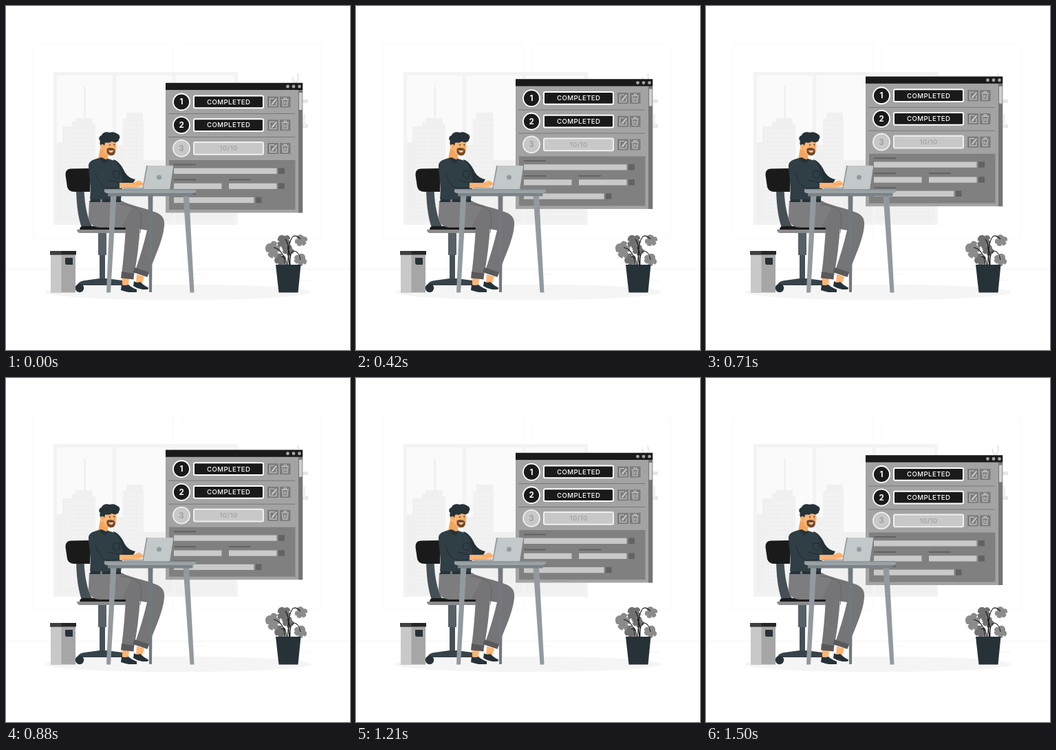
Recreate the animation shown at these times as an HTML page. Size 500x500 px, loop 1540 ms.

```html
<!DOCTYPE html>
<html lang="en">
<head>
<meta charset="utf-8">
<title>Completed tasks</title>
<style>
  html, body { margin: 0; width: 100%; height: 100%; overflow: hidden; background: #fff; }
  svg { display: block; width: 100vw; height: 100vh; }
  text { font-family: Inter, sans-serif; text-anchor: middle; }
  .label { font-size: 9.600px; font-weight: 500; letter-spacing: .45px; }
  .num { font-size: 11.500px; font-weight: 700; }
  .panel { animation: float 770ms linear -50ms infinite alternate; }
  @keyframes float {
    from { transform: translateY(.65px); }
    to { transform: translateY(-9.35px); }
  }
</style>
</head>
<body>
<svg viewBox="0 0 500 500" xmlns="http://www.w3.org/2000/svg">
  <defs>
    <pattern id="panes" width="5" height="6" patternUnits="userSpaceOnUse">
      <path d="M1 1h2.500v3H1z" fill="#f4f4f4"/>
    </pattern>
    <g id="icons">
      <path d="M380-8h16V8h-16zM398-8h15.500V8H398z" fill="#7c7c7c" stroke="none"/>
      <g fill="none" stroke="#c9c9c9" stroke-width="1.100">
        <path d="M390-5h-6.500V5.500h9.500v-6"/>
        <path d="M387.300 2.300l6-7" stroke-width="2"/>
        <path d="M386.500 3.300l.8-2 1.200 1z"/>
        <path d="M401.800-2.500l.8 8h6.300l.8-8M400.500-3.600H411M404-4v-1.800h3.600V-4M404.500-1v4.500M407-1v4.500"/>
      </g>
    </g>
    <g id="row">
      <circle cx="255" r="12" stroke-width="1.800"/>
      <rect x="273" y="-9" width="101" height="17.800" rx="2" stroke-width="2"/>
      <use href="#icons"/>
    </g>
    <path id="leaf" d="M0-9C3-13 9-11 10-6L7-4 11-2C12 2 10 5 8 6L5 5 6 8C4 11 1 12-2 12L-3 9-5 11C-9 10-11 6-10 3L-7 2-11 0C-12-6-8-12 0-9Z"/>
  </defs>

  <!-- room -->
  <g fill="none" stroke="#f9f9f9">
    <path d="M39.500 55.500h203v282h-203zM255 55.500h202.500v282H255z"/>
    <path d="M0 382.500h500M64 391.500h22M412 398.500h31M270 389.500h17" stroke="#f5f5f5"/>
  </g>
  <path d="M69 96h268v222H69z" fill="#f3f3f3"/>
  <path d="M74 101h81v212H74zM160 101h82v212h-82zM247 101h85v212h-85z" fill="#fafafa"/>
  <path d="M74 198h8v-23h14v-7h5v-5h12v-46h3v46h10v9h4v56h4v85H74zM160 202h10v-38h5v-9h24v9h1v60h42v89h-82zM247 240h32v30h53v43h-85z" fill="#f0f0f0"/>
  <path d="M84 178h44v126H84zM172 167h26v140h-26zM250 286h80v22h-80z" fill="url(#panes)"/>
  <g fill="none" stroke="#e6e6e6">
    <path d="M424 98l1 7q-1 5-5 8M416 103q1 6 4 10" stroke-width="2"/>
    <path d="M424 138.500h15M424 174.500h15" stroke-width="5"/>
    <path d="M433.500 157v18" stroke="#f0f0f0" stroke-width="3"/>
  </g>
  <ellipse cx="250" cy="416" rx="193.500" ry="11.300" fill="#f5f5f5"/>

  <!-- task window -->
  <g class="panel">
    <path d="M232 112h199.200v188.500H232z" fill="#a3a3a3"/>
    <path d="M425 122h6.200v178.500H425z" fill="#757575"/>
    <path d="M232 111.800h199.200V122H232z" fill="#1a1a1b"/>
    <g fill="#a6a6a6">
      <circle cx="409.500" cy="117" r="2.400"/><circle cx="418" cy="117" r="2.400"/><circle cx="426.500" cy="117" r="2.400"/>
    </g>
    <rect x="426" y="126" width="4.500" height="25" rx="1" fill="#cfcfcf"/>
    <path d="M236 156.500h184M236 190.500h184" stroke="#787878"/>
    <g fill="#1a1a1b" stroke="#fff">
      <use href="#row" y="139.500"/>
      <use href="#row" y="173.200"/>
    </g>
    <use href="#row" y="206.900" fill="#c8c8c8" stroke="#f0f0f0"/>
    <g fill="#fff">
      <text class="num" x="255" y="143.500">1</text>
      <text class="num" x="255" y="177.200">2</text>
      <text class="label" x="323.700" y="142.800">COMPLETED</text>
      <text class="label" x="323.700" y="176.500">COMPLETED</text>
    </g>
    <g fill="#a0a0a0">
      <text class="num" x="255" y="210.900">3</text>
      <text class="label" x="323.700" y="210.200">10/10</text>
    </g>
    <path d="M237 224h183.500v72H237z" fill="#808080"/>
    <path d="M244 229.500h32v2h-32zM244 251.500h32v2h-32zM324 251.500h32v2h-32zM244 272.500h32v2h-32zM396 235.500h9v8.500h-9zM396 257.500h9v8.500h-9zM363 277.700h8.500v8.500H363z" fill="#626262"/>
    <path d="M244 235.700h149.500v8.300H244zM244 257.700h69.500v8.300H244zM324 257.700h69.500v8.300H324zM244 277.900h116.500v8.300H244z" fill="#c9c9c9"/>
  </g>

  <!-- bin -->
  <path d="M65 361h36v55.500H65z" fill="#a6a6a6"/>
  <path d="M65 361h15.500v55.500H65z" fill="#c8c8c8"/>
  <path d="M64 356h38v5.500H64z" fill="#262626"/>
  <path d="M64 356h16.500v5.500H64z" fill="#3f3f3f"/>
  <path d="M86 366h11v10h-8.500q-2.500 0-2.500-3z" fill="#263238"/>

  <!-- chair -->
  <path d="M102 267h11.500c1 24 5 42 12 54h-16c-5-16-7-33-7.500-54z" fill="#455056"/>
  <path d="M94 236.500l28-.5v34H99q-8 0-10-7l-2.500-17q-.7-9 7.500-9.500z" fill="#1a1a1b"/>
  <path d="M136 360h8v38h-8z" fill="#455056"/>
  <path d="M134 329h12v33h-12z" fill="#566167"/>
  <path d="M104 405q2-5 10-6l22-3h10l24 3v7h-66z" fill="#37434a"/>
  <circle cx="107" cy="410" r="6.200" fill="#263238"/>
  <path d="M107 325q0-5 6-5h62v5z" fill="#1a1a1b"/>
  <path d="M103 325h71v5h-67q-4-1-4-5z" fill="#8b8b8d"/>

  <!-- legs -->
  <path d="M190 390l11 3-3 10-9-2zM169 395h10l-1 11h-9z" fill="#ffb573"/>
  <path d="M186 400q4 3 9 1 5 5 12 8.500 0 2.500-2 2.500h-7q-7-1-13-5z" fill="#263238"/>
  <path d="M168 405q5 2 10 0 4 4 12 7v4h-12q-5-1-11-3z" fill="#263238"/>
  <path d="M150 283h18c12 7 30 9 50 17 10 4 13 10 12 20-2 22-15 46-23 70l-19-6q10-28 17-58l-46-8z" fill="#757476"/>
  <path d="M121 283h45c3 6 13 7 20 9 9 3 11 12 9 26q-2 38-9 74l-18-2q4-32 6-68h-38q-15-1-15-15z" fill="#757476"/>
  <path d="M121 283h45c3 5 9 7 17 9l-15 29h-32q-16-1-16-15z" fill="#7d7c7e"/>
  <path d="M187 380l21 7-2.500 7-21-7zM168 386l18 3-.5 8.500-18.500-2z" fill="#59585b"/>
  <path d="M166 288q20 2 28 10 5 9 1 32" fill="none" stroke="#5f5e61" stroke-width=".8"/>

  <!-- torso and head -->
  <path d="M137 207h12l-1 13 3 5-7 3-10-6z" fill="#f3a45f"/>
  <path d="M156 223c9 3 13 11 17 19q5 8 15 10l-4 7-18-1z" fill="#263238"/>
  <path d="M135 221q6 4 13 1l7 2c7 2 9 8 11 14l4 18-3 25h-45c2-17-1-32-2-47-.5-8 4-10 15-13z" fill="#303e45"/>
  <path d="M130 243c4 12 9 21 18 22l17-1M148 253l17 4M156 240h9v8l-4 3-5-3z" fill="none" stroke="#1d282d" stroke-width=".8"/>
  <path d="M135 221q3 5 9 8 5-4 5-7l-2 2-8-4z" fill="#263238"/>
  <path d="M123 281h44v4h-45z" fill="#263238"/>
  <path d="M137 281h3v4h-3zM152 281h3v4h-3z" fill="#747c80"/>
  <path d="M165 257h18c5 0 7-4 12-3q4 2 5 5l-4 3-11 2-20 1z" fill="#ffb573"/>
  <path d="M183 258q6 2 14 0" fill="none" stroke="#e59655" stroke-width=".7"/>

  <path d="M140 193q10-5 19 0c2 8 2 14 0 20-3 5-8 6-13 3-5-4-6-13-6-23z" fill="#ffb573"/>
  <path d="M146.500 207.500q6-3 11.500.5 2 5-1.500 8.500-7 2.500-10-4z" fill="#70492f"/>
  <path d="M148.500 209.500q4 1 8 0-1 4.500-5 3.500-2-1-3-3.500z" fill="#f6b277"/>
  <path d="M149.500 210q3 1 5.500.2-2 2.600-5.500-.2z" fill="#fff"/>
  <path d="M155 200l3.200 5.500-3 .7" fill="none" stroke="#e28d4d" stroke-width=".9"/>
  <path d="M148 199q2-2 4-1M156.500 197.500l3 .5" fill="none" stroke="#263238"/>
  <circle cx="151" cy="202" r=".9" fill="#263238"/>
  <circle cx="157.500" cy="201.500" r=".9" fill="#263238"/>
  <path d="M139 207c-1-4-4-7-2-11-3-2-2-7 2-8 1-4 7-6 12-4 4-2 9 0 11 2 4 1 4 6 2 8 0 4-6 5-10 3-4 2-8 1-10 2l-2 8z" fill="#263238"/>
  <ellipse cx="140" cy="205" rx="3" ry="4" fill="#ffb573"/>
  <path d="M138.500 203q3 1 2 4" fill="none" stroke="#e28d4d" stroke-width=".7"/>

  <!-- desk -->
  <path d="M206.500 275h7l-1.500 141h-4z" fill="#71797e"/>
  <path d="M152 275h8.500L152 416.500h-6zM257.500 275h8.500l7.500 141.500h-6z" fill="#929a9f"/>
  <path d="M148 271h123.500v5.500H148z" fill="#7b8388"/>
  <path d="M143 266h133v4q-2 2-5 2H148q-4 0-5-2z" fill="#9aa2a6"/>
  <path d="M143 266h133v1.500H143z" fill="#858e92"/>
  <path d="M169 263.500h32l36 1v2h-65z" fill="#a8b0b3"/>
  <path d="M204 232h37.500q2 0 1.500 2l-5 32h-40z" fill="#929b9f"/>
  <path d="M206 232h35.500q2 0 1.500 2l-5 32h-38.500z" fill="#c3c8ca"/>
  <circle cx="222.500" cy="249" r="3.500" fill="#929b9f"/>

  <!-- plant -->
  <g fill="#8b8b8b">
    <use href="#leaf" transform="translate(388 354) rotate(-20) scale(.92 1.050)"/>
    <use href="#leaf" transform="translate(429 341) scale(.75) rotate(35)"/>
    <use href="#leaf" transform="translate(428 369) scale(.78) rotate(80)"/>
  </g>
  <g fill="#707070">
    <use href="#leaf" transform="translate(404 342) scale(.85) rotate(10)"/>
    <use href="#leaf" transform="translate(399 369) scale(.75) rotate(-45)"/>
    <use href="#leaf" transform="translate(410 355) scale(.7) rotate(70)"/>
  </g>
  <g fill="none" stroke="#1a1a1b" stroke-width="1.100">
    <path d="M409 377q4-31-3-38M412 377q-4-31 5-42 5-3 11 4M413 377q-1-20 6-21 7 1 9 13M406 377q-2-23-17-26M408 377q-1-16-8-12M411 377q5-15-2-26"/>
  </g>
  <path d="M392 376h36.500l-4 40.500h-28z" fill="#263238"/>
</svg>
</body>
</html>
```
